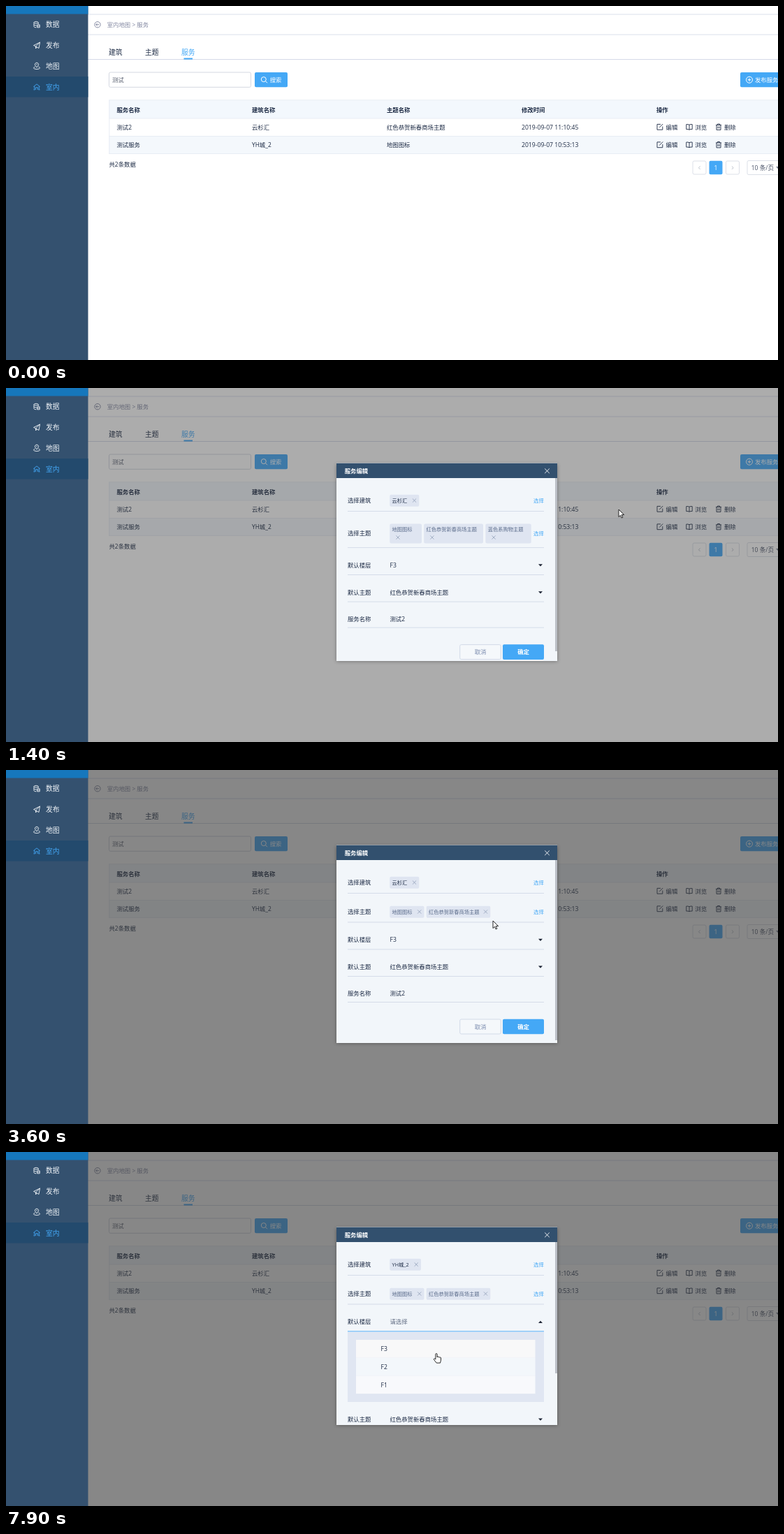
An HTML page with a canvas for the animation above (8000 ms loop, 1105 by 507 pixels).

```html
<!DOCTYPE html>
<html lang="zh-CN">
<head>
<meta charset="utf-8">
<title>服务编辑</title>
<style>
html, body { margin: 0; width: 100%; height: 100%; overflow: hidden; background: #fff; }
canvas { display: block; width: 1105px; height: 507px; }
</style>
</head>
<body>
<canvas id="stage"></canvas>
<script>
const W = 1105, H = 507, LOOP = 8000, STEP = 100;
const FONT = '"Open Sans", "Noto Sans CJK SC", "Noto Sans CJK", sans-serif';
const BLUE = '#44a8f6', INK = '#1d2b45', NAVY = '#32506e', LINE = '#d5dce9', PANEL = '#e0e6f2';
const dpr = window.devicePixelRatio || 1;

function setup(canvas) {
  canvas.width = W * dpr;
  canvas.height = H * dpr;
  const ctx = canvas.getContext('2d');
  ctx.scale(dpr, dpr);
  return ctx;
}
const screen2d = setup(document.getElementById('stage'));
const layer = document.createElement('canvas');
const layer2d = setup(layer);
let g = screen2d;

const ICONS = {
  data: 'M-4-3.2a3.1 1.3 0 1 0 6.2 0a3.1 1.3 0 1 0-6.2 0V2.6q0 1.4 3.2 1.4M-4-.3q0 1.4 3.6 1.4M2.2-3.2V-.6M.6 0h3.6v4H.6zM.6 2h3.6',
  plane: 'M4.5-4.5L-4.5 0L-1.5 1.3L3 4zM-1.5 1.3V4.5L.3 2.4M-1.5 1.3L4.5-4.5',
  pin: 'M0 1.8L-2.2-1a2.6 2.6 0 1 1 4.4 0zM-.8-2.4h1.6M-2.5 1Q-4.5 1.5-4.5 2.5q0 1.8 4.5 1.8t4.5-1.8q0-1-2-1.5',
  house: 'M-4.6-.4L0-4L4.6-.4M-3.3-1V4M3.3-1V4M-1.4 4V.8h2.8V4M-4.5 4h2M2.5 4h2',
  back: 'M4.2 0a4.2 4.2 0 1 0-8.4 0a4.2 4.2 0 1 0 8.4 0M2.2 0H-2.2M-.5-1.8L-2.2 0L-.5 1.8',
  find: 'M2.8-.6a3.5 3.5 0 1 0-7 0a3.5 3.5 0 1 0 7 0M2 2L4.5 4.5',
  plus: 'M4.5 0a4.5 4.5 0 1 0-9 0a4.5 4.5 0 1 0 9 0M-2.3 0h4.6M0-2.3v4.6',
  edit: 'M1-3.8H-4V4H3.8V-.6M-.9 1L4.2-4.2',
  book: 'M0-3Q-2-4-4.2-3.6V3.4Q-2 3 0 4Q2 3 4.2 3.4V-3.6Q2-4 0-3V4',
  trash: 'M-4-2.8h8M-1.5-2.8V-4.2h3v1.4M-3-2.8V4.2h6v-7M-1-.8v3M1-.8v3',
  check: 'M-3.4 0L-1 2.6L3.6-2.6',
  prev: 'M1.1-2.2L-1.1 0L1.1 2.2',
  next: 'M-1.1-2.2L1.1 0L-1.1 2.2'
};
const ARROW = new Path2D('M0 0V10.6L2.5 8.3L4.1 12L5.8 11.3L4.2 7.6H7.7z');
const HAND = new Path2D('M-1.1 8.6V1.2a1.1 1.1 0 0 1 2.2 0V5.4a1 1 0 0 1 2 .2a1 1 0 0 1 1.8.3a.9.9 0 0 1 1.6.5V9.6L5.5 13.6H.2L-3.6 8.7a1 1 0 0 1 1.5-1.2z');

function text(s, x, y, color = INK, size = 8.4, weight = 400, align = 'left') {
  g.font = `${weight} ${size}px ${FONT}`;
  g.textAlign = align;
  g.fillStyle = color;
  g.fillText(s, x, y + size * 0.37);
}
function rect(x1, y1, x2, y2, color) {
  g.fillStyle = color;
  g.fillRect(x1, y1, x2 - x1, y2 - y1);
}
function box(x1, y1, x2, y2, fill, border, r = 2) {
  g.beginPath();
  g.roundRect(x1, y1, x2 - x1, y2 - y1, r);
  if (fill) { g.fillStyle = fill; g.fill(); }
  if (border) { g.strokeStyle = border; g.lineWidth = 0.9; g.stroke(); }
}
function icon(name, x, y, color, width = 0.9, scale = 1) {
  g.save();
  g.translate(x, y);
  g.scale(scale, scale);
  g.strokeStyle = color;
  g.lineWidth = width;
  g.stroke(new Path2D(ICONS[name]));
  g.restore();
}
function cross(x, y, r, color) {
  g.strokeStyle = color;
  g.lineWidth = 0.9;
  g.beginPath();
  g.moveTo(x - r, y - r); g.lineTo(x + r, y + r);
  g.moveTo(x + r, y - r); g.lineTo(x - r, y + r);
  g.stroke();
}
function caret(x, y, up, color = '#1b2233') {
  const h = up ? -1.6 : 1.6;
  g.fillStyle = color;
  g.beginPath();
  g.moveTo(x - 3, y - h); g.lineTo(x + 3, y - h); g.lineTo(x, y + h);
  g.fill();
}

function sidebar() {
  rect(0, 0, 117.5, H, '#34516f');
  rect(0, 0, 117.5, 11.5, '#1677bc');
  rect(0, 101, 117.5, 130.5, '#234a6d');
  [['data', '数据'], ['plane', '发布'], ['pin', '地图'], ['house', '室内']].forEach(([name, label], i) => {
    const y = 26.8 + i * 29.7, color = i === 3 ? BLUE : '#f0f4f8';
    icon(name, 44, y, color);
    text(label, 57, y, color, 9.8);
  });
}

function page() {
  rect(0, 0, W, H, '#fff');
  rect(117, 11.5, W, 12.5, '#dcdfeb');
  rect(117, 40.5, W, 41.5, '#dcdfeb');
  icon('back', 131, 26.7, '#7c829c');
  text('室内地图 > 服务', 144.7, 26.5, '#858aa3');

  rect(117, 76, W, 77, '#d5dae8');
  ['建筑', '主题', '服务'].forEach((s, i) => text(s, 147 + i * 52, 66.5, i === 2 ? BLUE : INK, 9.8));
  rect(254.5, 74.5, 267, 76.5, BLUE);

  box(147.5, 95, 350.5, 116.3, '#fff', '#d0d4de');
  text('测试', 152, 106, '#596070');
  box(356, 95, 403, 116.3, BLUE);
  icon('find', 369.5, 105.7, '#fff', 1);
  text('搜索', 377.7, 105.7, '#fff', 8.4, 500);
  box(1051, 95, 1125, 116.3, BLUE);
  icon('plus', 1064, 105.7, '#fff', 1);
  text('发布服务', 1072, 105.7, '#fff', 8.4, 500);

  const cols = [158.5, 352, 545, 738, 931];
  rect(147.5, 134.5, W, 161, '#f3f8fd');
  rect(147.5, 186.3, W, 211.8, '#f4f8fc');
  [134.5, 160.7, 186, 211.3].forEach(y => rect(147.5, y, W, y + 0.7, '#e3e9f1'));
  rect(147.5, 134.5, 148.3, 212, '#e3e9f1');
  ['服务名称', '建筑名称', '主题名称', '修改时间', '操作'].forEach((s, i) => text(s, cols[i], 148.5, INK, 8.4, 700));
  [
    ['测试2', '云杉汇', '红色恭贺新春商场主题', '2019-09-07 11:10:45'],
    ['测试服务', 'YH城_2', '地图图标', '2019-09-07 10:53:13']
  ].forEach((row, r) => {
    const y = 173.5 + r * 25.5;
    row.forEach((s, i) => text(s, cols[i], y, INK, i === 3 ? 8.65 : 8.4));
    [['edit', '编辑'], ['book', '浏览'], ['trash', '删除']].forEach(([name, s], i) => {
      icon(name, 936 + i * 42, y - 0.3, INK);
      text(s, 944.6 + i * 41.7, y);
    });
  });

  text('共2条数据', 147.5, 227.3);
  box(983, 222, 1002, 241, '#fff', '#d9dde6');
  icon('prev', 992.5, 231.7, '#b5bac6');
  box(1006.5, 221.7, 1025.5, 241.3, BLUE);
  text('1', 1016, 231.5, '#fff', 8.6, 400, 'center');
  box(1030.5, 222, 1049.5, 241, '#fff', '#d9dde6');
  icon('next', 1040, 231.7, '#b5bac6');
  box(1061, 221.5, 1125, 241.5, '#fff', '#d9dde6');
  text('10 条/页', 1066.7, 231.5, '#4c556a', 8.6);
  caret(1105, 231.7, false, '#7b8293');
}

function tag(x1, x2, y, label, color, tall) {
  box(x1, y, x2, y + (tall ? 28 : 17), '#dfe5f1');
  text(label, x1 + 3.3, y + 8.4, color, 7.25);
  if (tall) cross(x1 + 11.7, y + 19.6, 2.6, '#9aa7bf');
  else cross(x2 - 6.8, y + 8.3, 2.6, '#9aa7bf');
}
function field(label, y, lineY, active) {
  text(label, 489, y);
  rect(489, lineY, 770, lineY + 1, active ? BLUE : LINE);
}

function buildingPicker(T, picked) {
  rect(489, 177, 770, 392, PANEL);
  box(501, 188.8, 757.5, 209.3, '#fff', '#d9dfeb');
  text('搜索', 505.5, 199, '#b8bfcc');
  icon('find', 748, 198.2, '#5f6b82', 1, 0.8);

  rect(501, 216, 757.5, 242, '#f3f8fd');
  ['建筑名称', '类型', '修改时间'].forEach((s, i) => text(s, [536.5, 625, 672.5][i], 229, INK, 8.4, 700));
  [
    ['YH城_2', '05 17:46:', '06'],
    ['云杉汇', '05 18:08:', '33'],
    ['岚溪湾双禾商业中心', '05 17:55:', '52'],
    ['青榆城', '05 17:58:', '49'],
    ['禾岭云帆广场', '27 18:41:', '14']
  ].forEach(([name, stamp, sec], i) => {
    const top = 242 + i * 25.6, y = top + 12.8, on = i === (picked ? 0 : 1);
    const hover = i === 0 && T >= 4700 && T < 5600;
    rect(501, top, 757.5, top + 25.6, on ? '#d1e9fe' : hover ? '#f7f7f9' : i % 2 ? '#f3f8fc' : '#fff');
    if (on) icon('check', 517, y - 0.3, '#2f9bf3', 1.6);
    if (name.length > 8) {
      text(name.slice(0, 8), 536.5, y - 6);
      text(name.slice(8), 536.5, y + 6.3);
    } else text(name, 536.5, y);
    text('商城', 625, y);
    text(`2019-0${i === 4 ? 8 : 9}-${stamp}`, 672.5, y - 6.6, INK, 8.65);
    text(sec, 672.5, y + 6, INK, 8.65);
  });

  [667.3, 691, 715, 739].forEach((x, i) => {
    box(x, 376, x + 18.8, 395, i === 1 ? BLUE : '#fff');
    if (i === 0) icon('prev', x + 9.4, 385.5, '#b5bac6');
    else if (i === 3) icon('next', x + 9.4, 385.5, INK);
    else text(i, x + 9.4, 385.2, i === 1 ? '#fff' : INK, 8.6, 400, 'center');
  });
}

function floorPicker() {
  rect(489, 257.8, 770, 358, PANEL);
  ['F3', 'F2', 'F1'].forEach((s, i) => {
    const top = 269 + i * 25.7;
    rect(501, top, 757.5, top + 25.7, ['#f8f8f9', '#f3f7fb', '#f8f9fc'][i]);
    text(s, 536.5, top + 13, INK, 8.6);
  });
}

function form(T) {
  const three = T < 3600, picked = T >= 5100;
  const choosing = T >= 4400 && T < 6200, floors = T >= 7300;
  const thumbEnd = three ? 377 : choosing ? 267 : floors ? 317 : 387;
  rect(786, 129, 789, thumbEnd, '#bcc0c7');

  field('选择建筑', 161.3, 176, choosing);
  if (picked) tag(549.3, 594, 152.8, 'YH城_2', INK);
  else tag(549.3, 591.3, 152.8, '云杉汇', INK);
  text('选择', 755, 161.3, BLUE, 7.4);
  if (choosing) return buildingPicker(T, picked);

  let dy = three ? 10.6 : 0;
  const grey = '#5b6c8b', ty = 203 + dy / 2;
  field('选择主题', ty, 217.5 + dy);
  text('选择', 755, ty, BLUE, 7.4);
  if (three) {
    tag(549.3, 595, 194.4, '地图图标', grey, true);
    tag(598.2, 683, 194.4, '红色恭贺新春商场主题', grey, true);
    tag(686.4, 751.7, 194.4, '蓝色系购物主题', grey, true);
  } else {
    tag(549.3, 598.5, 194.7, '地图图标', grey);
    tag(601.7, 693.3, 194.7, '红色恭贺新春商场主题', grey);
  }

  field('默认楼层', 243.3 + dy, 256.4 + dy, floors);
  if (picked) text('请选择', 549.5, 243.3 + dy, '#5f6b82');
  else text('F3', 549.5, 243.3 + dy, INK, 8.6);
  caret(765, 243.3 + dy, floors);
  if (floors) { floorPicker(); dy += 101; }

  field('默认主题', 282.2 + dy, 295 + dy);
  text('红色恭贺新春商场主题', 549.5, 282.2 + dy);
  caret(765, 282.2 + dy);
  field('服务名称', 320.3 + dy, 332 + dy);
  text('测试2', 549.5, 320.3 + dy);

  box(649.7, 357 + dy, 708.3, 378 + dy, '#f5f8fb', '#cfd7e6');
  text('取消', 679, 367.5 + dy, '#7a8bae', 8.4, 400, 'center');
  box(711, 356.7 + dy, 770, 378.3 + dy, BLUE);
  text('确定', 740.5, 367.5 + dy, '#fff', 8.4, 700, 'center');
}

function dialog(T) {
  g.clearRect(0, 0, W, H);
  g.save();
  g.shadowColor = 'rgba(0,0,0,.35)';
  g.shadowBlur = 5 * dpr;
  g.shadowOffsetY = dpr;
  rect(473, 107.5, 789, 391, '#f2f6fa');
  g.restore();
  g.save();
  g.beginPath();
  g.rect(473, 107.5, 316, 283.5);
  g.clip();
  rect(473, 107.5, 789, 129, NAVY);
  text('服务编辑', 484.7, 119, '#fff', 8.4, 700);
  cross(774.5, 118.8, 3.3, '#fff');
  form(T);
  g.restore();
}

// time, x, y, hand shape
const MOVES = [
  [300, 165, 62], [700, 1036, 171], [1000, 943, 165, 1], [1300, 943, 165], [1500, 811, 183],
  [2000, 761, 164], [2400, 761, 164], [3200, 697, 216], [3300, 697, 216, 1], [3600, 697, 216],
  [4100, 761, 160, 1], [4400, 761, 160, 1], [4800, 659, 251.5, 1], [5300, 659, 249, 1],
  [5800, 765, 160], [6000, 766, 160, 1], [6100, 766, 160, 1], [6200, 751, 191.5],
  [6800, 764, 245], [7100, 764, 245, 1], [7300, 764, 245, 1], [7900, 616, 288.5, 1]
];
function pointer(T) {
  if (T < MOVES[0][0]) return;
  let i = MOVES.length - 1;
  while (MOVES[i][0] > T) i--;
  const a = MOVES[i], b = MOVES[i + 1] || a;
  const k = b === a ? 0 : (T - a[0]) / (b[0] - a[0]);
  const shape = a[3] ? HAND : ARROW;
  g.save();
  g.translate(a[1] + (b[1] - a[1]) * k, a[2] + (b[2] - a[2]) * k);
  g.fillStyle = '#fff';
  g.fill(shape);
  g.strokeStyle = '#111';
  g.lineWidth = 0.9;
  g.stroke(shape);
  g.restore();
}

const ramp = (T, start, span) => Math.min(1, Math.max(0, (T - start) / span));

function draw(T) {
  g = screen2d;
  page();
  const shown = ramp(T, 1100, 300);
  if (shown) {
    rect(117, 0, W, H, `rgba(55,55,55,${0.6 * ramp(T, 1100, 400) ** 1.3})`);
    g = layer2d;
    dialog(T);
    g = screen2d;
    const s = 0.9 + 0.1 * shown;
    g.save();
    g.globalAlpha = shown;
    g.translate(631, 249.2);
    g.scale(s, s);
    g.drawImage(layer, -631, -249.2, W, H);
    g.restore();
  }
  sidebar();
  pointer(T);
}

let last = -1;
function tick() {
  const T = Math.floor((performance.now() % LOOP) / STEP) * STEP;
  if (T !== last) draw(last = T);
  requestAnimationFrame(tick);
}
tick();
</script>
</body>
</html>
```
